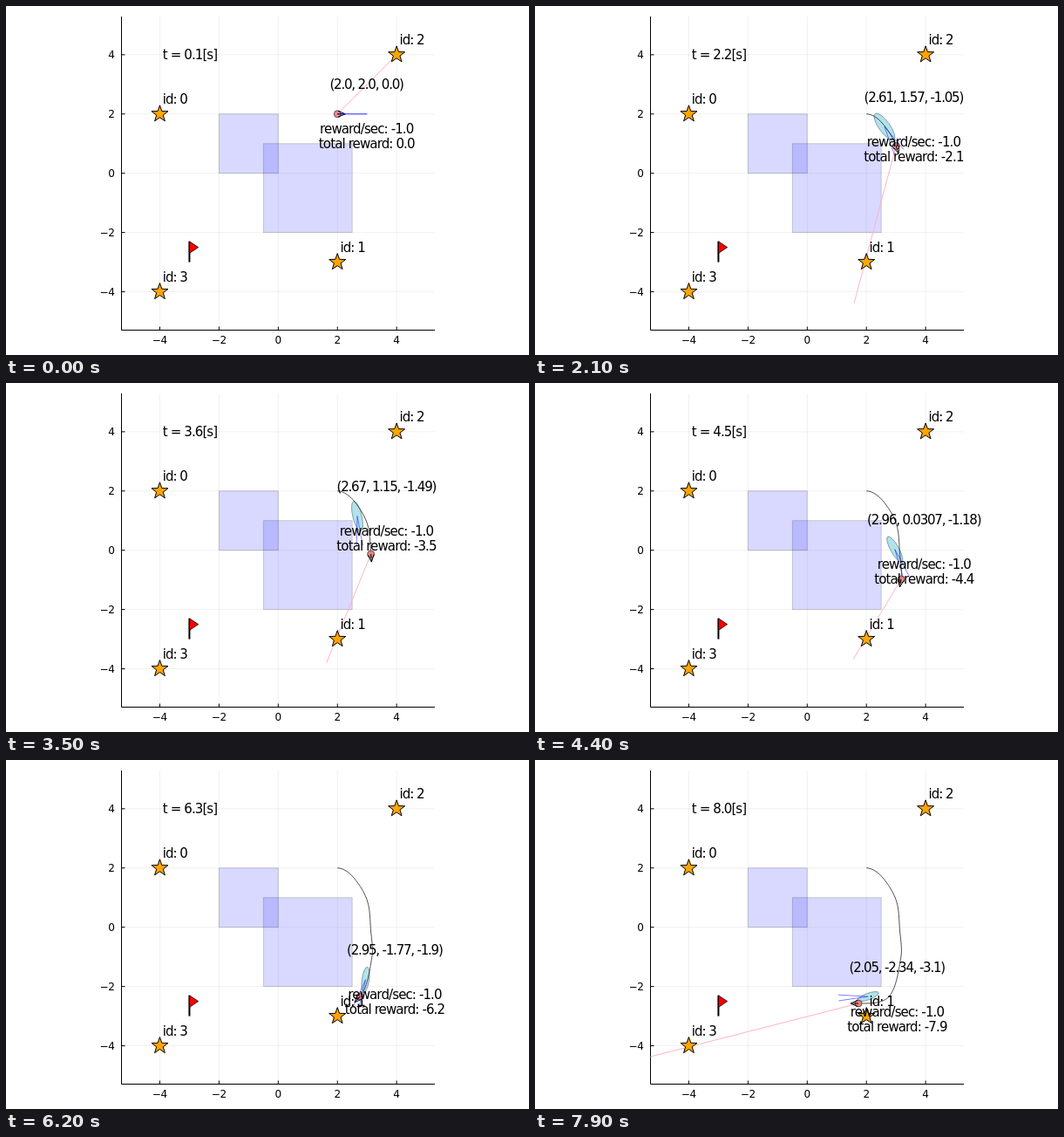
Animation of 600 by 400 pixels, one loop 8 s. Source, as an HTML page with a canvas:

```html
<!DOCTYPE html>
<html>
<head>
<meta charset="utf-8">
<style>
html, body { margin: 0; width: 100%; height: 100%; overflow: hidden; background: #fff; }
canvas { display: block; width: 600px; height: 400px; }
</style>
</head>
<body>
<canvas id="stage" width="600" height="400"></canvas>
<script>
const ctx = document.getElementById('stage').getContext('2d');
const FONT = '"DejaVu Sans", sans-serif';
const UNIT = 33.96, STEP = 100, STEPS = 80;
const LEFT = 132.5, RIGHT = 492, TOP = 12, BOTTOM = 371.5;
const px = x => 312.3 + UNIT * x;
const py = y => 191.7 - UNIT * y;
const at = ([x, y]) => [px(x), py(y)];

const stars = [[-4, 2], [2, -3], [4, 4], [-4, -4]];

// Time, robot x, y, estimated x, y, theta; the outer rows only steer the curve
const keys = [
  [-0.8, 1.5, 1.73, 1.58, 2.27, 0.56],
  [0.1, 2, 2, 2, 2, 0],
  [1, 2.5, 1.73, 2.42, 1.73, -0.564],
  [2.2, 3, 0.92, 2.61, 1.57, -1.05],
  [3.6, 3.13, -0.13, 2.67, 1.15, -1.49],
  [4.5, 3.17, -0.98, 2.96, 0.0307, -1.18],
  [6.3, 2.76, -2.34, 2.95, -1.77, -1.9],
  [8, 1.73, -2.57, 2.05, -2.34, -3.1],
  [9.7, 0.7, -2.36, 1.1, -2.4, -4.2]
];

// Smooth curve through the keys
function pose(t) {
  let i = 1;
  while (i < keys.length - 3 && t >= keys[i + 1][0]) i++;
  const [a, b, c, d] = keys.slice(i - 1, i + 3);
  const span = c[0] - b[0], u = (t - b[0]) / span, w = 1 - u;
  return b.slice(1).map((from, k) => {
    const to = c[k + 1];
    const out = (to - a[k + 1]) / (c[0] - a[0]) * span;
    const into = (d[k + 1] - from) / (d[0] - b[0]) * span;
    return from * w * w * (1 + 2 * u) + to * u * u * (3 - 2 * u)
      + out * u * w * w - into * u * u * w;
  });
}

function headingAt(t) {
  const [x, y] = pose(t), [nx, ny] = pose(t + 0.001);
  return Math.atan2(y - ny, nx - x);
}

const noise = n => {
  const s = Math.sin(n * 127.1 + 3.7) * 43758.5453;
  return 2 * (s - Math.floor(s)) - 1;
};

function sig3(n) {
  const s = String(Number(n.toPrecision(3)));
  return s.includes('.') ? s : s + '.0';
}

function trace(points) {
  ctx.beginPath();
  points.forEach(p => ctx.lineTo(p[0], p[1]));
}

function line(points, color, width) {
  trace(points);
  ctx.strokeStyle = color;
  ctx.lineWidth = width;
  ctx.stroke();
}

function paint(fill, stroke, width) {
  ctx.fillStyle = fill;
  ctx.fill();
  ctx.strokeStyle = stroke;
  ctx.lineWidth = width;
  ctx.stroke();
}

function shape(points, fill, stroke, width) {
  trace(points);
  ctx.closePath();
  paint(fill, stroke, width);
}

function text(s, x, y, align = 'left', spacing = -1, size = 15) {
  ctx.font = size + 'px ' + FONT;
  ctx.letterSpacing = spacing + 'px';
  ctx.textAlign = align;
  ctx.fillStyle = '#000';
  ctx.fillText(s, x + (align === 'center' ? spacing / 2 : 0), y + size * 0.36);
}

const polar = (x, y, r, a) => [x + r * Math.cos(a), y + r * Math.sin(a)];

function drawAxes() {
  for (let k = -4; k <= 4; k += 2) {
    const x = px(k), y = py(k), label = String(k).replace('-', '\u2212');
    line([[x, TOP], [x, BOTTOM]], 'rgba(0,0,0,.1)', 0.6);
    line([[LEFT, y], [RIGHT, y]], 'rgba(0,0,0,.1)', 0.6);
    line([[x, BOTTOM], [x, BOTTOM - 4]], '#000', 1);
    line([[LEFT, y], [LEFT + 4, y]], '#000', 1);
    text(label, x, 383, 'center', -0.4, 12);
    text(label, 124.5, y, 'right', -0.4, 12);
  }
  line([[LEFT, TOP], [LEFT, BOTTOM], [RIGHT, BOTTOM]], '#000', 1);
}

function drawBox(x, y, size) {
  const corners = [[x, y], [x + size, y], [x + size, y - size], [x, y - size]];
  shape(corners.map(at), 'rgba(0,0,255,.15)', 'rgba(0,0,0,.18)', 1);
}

function drawFlag() {
  line([[-3, -3], [-3, -2.3]].map(at), '#000', 2);
  shape([[-3, -2.3], [-2.7, -2.5], [-3, -2.7]].map(at), '#f00', '#000', 0.8);
}

function drawStars() {
  stars.forEach(([x, y], id) => {
    const points = Array.from({ length: 10 }, (_, k) =>
      polar(px(x), py(y), k % 2 ? 4 : 10, (k / 5 - 0.5) * Math.PI));
    shape(points, '#ffa500', '#000', 1);
    text('id: ' + id, px(x + 0.1), py(y + 0.5));
  });
}

// Rays reach only landmarks within range and field of view
function drawRays(n, x, y, heading) {
  const gain = 1 + 0.33 * Math.min(1, n / 9);
  stars.forEach(([sx, sy], id) => {
    const dx = px(sx) - x, dy = py(sy) - y;
    const dist = Math.hypot(dx, dy), angle = Math.atan2(dy, dx);
    if (dist < 1.04 * UNIT || dist > 6 * UNIT || Math.cos(angle - heading) < 0.44) return;
    const reach = dist * (gain + 0.05 * noise(n + id * 91) * Math.min(1, n));
    const bearing = angle + 0.02 * noise(n + 300 + id * 91) * Math.min(1, n);
    line([[x, y], polar(x, y, reach, bearing)], '#ffb3c4', 1);
  });
}

function drawRobot(x, y, heading) {
  ctx.beginPath();
  ctx.arc(x, y, 4, 0, 2 * Math.PI);
  paint('rgba(240,120,120,.9)', '#333', 0.7);
  const tip = polar(x, y, 9, heading);
  line([[x, y], tip], '#000', 1);
  line([-0.4, 0, 0.4].map(a => a ? polar(...tip, 9, heading + Math.PI + a) : tip), '#000', 1);
}

// Uncertainty grows quickly, then settles as landmarks are seen
function drawEllipse(x, y, theta, s) {
  const long = 23 * (1 - Math.exp(-s / 0.8)) * Math.exp(-s / 14);
  const short = long * (0.28 + 0.8 * Math.exp(-1.2 * s));
  if (!s) return;
  ctx.beginPath();
  ctx.ellipse(x, y, long, short, -0.9 * theta, 0, 2 * Math.PI);
  paint('#b2e3eb', '#6f8a8d', 0.8);
}

function drawBearing(x, y, theta, s) {
  const spread = 0.1 * (1 - Math.exp(-s)) + 2.9 * s * Math.exp(-2 * s);
  for (const side of [-1, 1])
    line([[x, y], polar(x, y, UNIT, -theta + side * spread)], 'rgba(20,20,255,.6)', 0.9);
}

function drawStep(n) {
  const s = n / 10, t = s + 0.1;
  const [rx, ry, gx, gy, theta] = pose(t);
  const heading = headingAt(t);
  const [x, y] = at([rx, ry]), [cx, cy] = at([gx, gy]);
  const trail = Array.from({ length: n + 1 }, (_, k) => at(pose((k + 1) / 10)));

  ctx.clearRect(0, 0, 600, 400);
  drawAxes();
  drawBox(-2, 2, 2);
  drawBox(-0.5, 1, 3);
  drawFlag();

  ctx.save();
  ctx.beginPath();
  ctx.rect(LEFT, TOP, RIGHT - LEFT, BOTTOM - TOP);
  ctx.clip();
  drawRays(n, x, y, heading);
  drawEllipse(cx, cy, theta, s);
  line(trail, '#222', 0.8);
  ctx.restore();

  drawStars();
  drawRobot(x, y, heading);
  drawBearing(cx, cy, theta, s);

  const mid = cx + UNIT;
  text(`t = ${t.toFixed(1)}[s]`, px(-3.9), py(4), 'left', -0.9);
  text(`(${[gx, gy, theta].map(sig3).join(', ')})`, mid, cy - UNIT, 'center', -1.2);
  text('reward/sec: -1.0', mid, cy + UNIT / 2, 'center', -0.88);
  text('total reward: ' + (n ? '-' : '') + s.toFixed(1), mid, cy + UNIT, 'center', -0.88);
}

let shown = -1;
const start = performance.now();
function tick() {
  const n = Math.floor((performance.now() - start) / STEP) % STEPS;
  if (n !== shown) drawStep(shown = n);
  requestAnimationFrame(tick);
}
tick();
</script>
</body>
</html>
```
